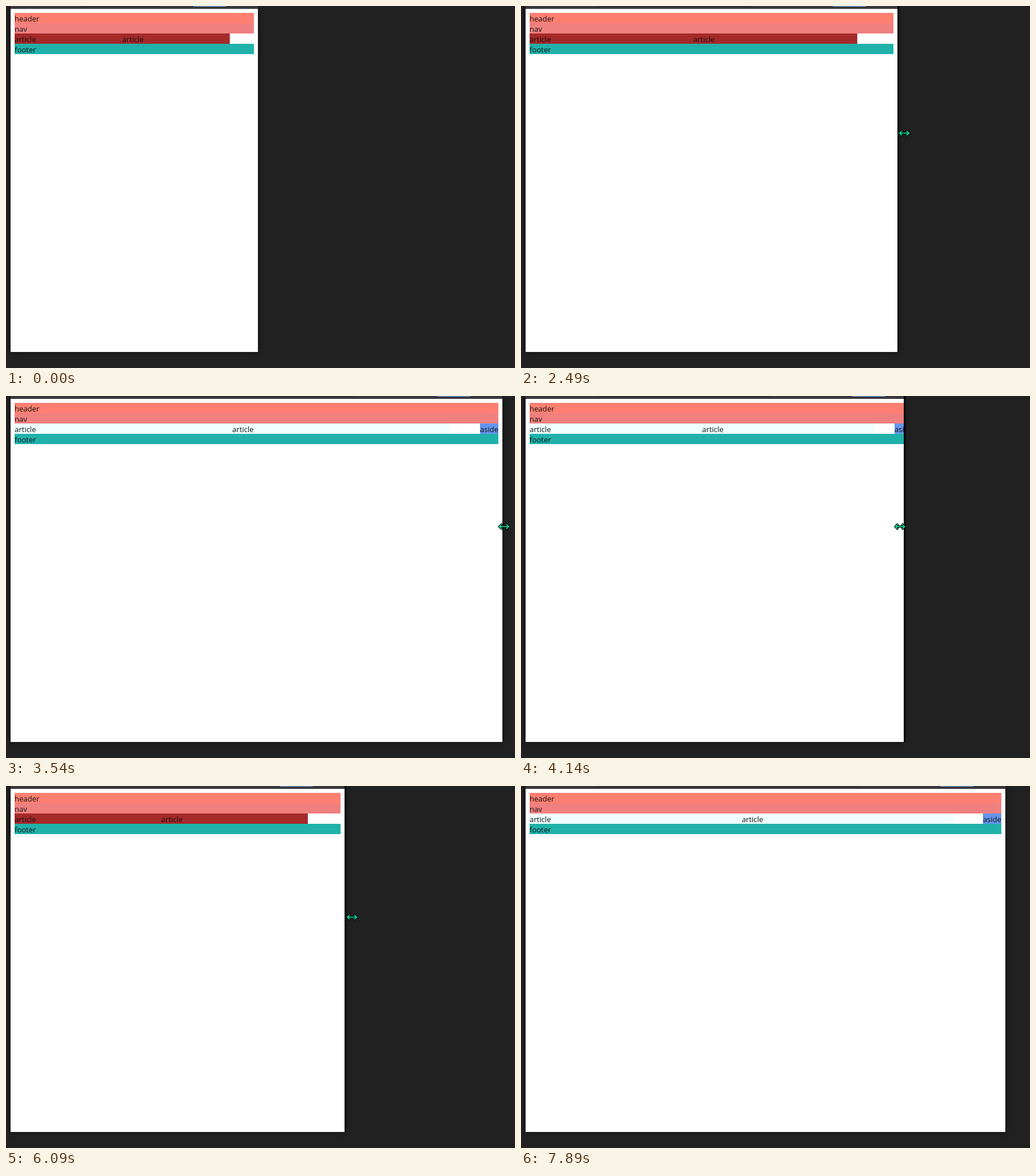
These frames come from a looping animation (887x632 px, 7.98 s). An HTML page:

```html
<!DOCTYPE html>
<html lang="en">
<head>
<meta charset="utf-8">
<title>Responsive layout</title>
<style>
html, body { margin: 0; width: 100%; height: 100%; overflow: hidden; background: #212121; }
#stage { position: relative; width: 887px; height: 632px; overflow: hidden; background: #212121; }
#stage div, #stage svg { position: absolute; }
#panel { left: 8px; top: 0; height: 604px; overflow: hidden; background: #fff; box-shadow: 0 0 9px rgba(0, 0, 0, .55); }
#bar { left: 0; top: 0; width: 100%; height: 5px; background: #3a373b; }
#field { left: 123px; top: 0; height: 1px; background: #29272b; border-radius: 0 0 4px 4px; }
#button { top: 0; width: 58px; height: 1px; background: #6fb2ea; border-radius: 0 0 5px 5px; }
#page { left: 7px; top: 12px; font: 13px/18px "Open Sans", "Noto Sans", sans-serif; color: #111; }
#page div { height: 18px; }
#page span { position: relative; top: 1px; }
.row { left: 0; width: 100%; }
.article { top: 36px; width: 45%; background: #a52a2a; }
.wide .article { background: #f0ffff; }
#aside { display: none; top: 36px; right: 0; background: #6495ed; }
.wide #aside { display: block; }
#gap { top: 0; height: 604px; background: #000; }
svg { left: 0; top: 0; overflow: visible; fill: none; stroke-linejoin: round; stroke-linecap: round; }
</style>
</head>
<body>
<div id="stage">
  <div id="panel">
    <div id="bar"></div><div id="field"></div><div id="button"></div>
    <div id="page">
      <div class="row" style="top:0;background:#ff8071"><span>header</span></div>
      <div class="row" style="top:18px;background:#f08080"><span>nav</span></div>
      <div class="article" style="left:0"><span>article</span></div>
      <div class="article" style="left:45%"><span>article</span></div>
      <div id="aside"><span>aside</span></div>
      <div class="row" style="top:54px;background:#20b2aa"><span>footer</span></div>
    </div>
  </div>
  <div id="gap"></div>
  <svg id="resize" width="1" height="1">
    <path id="arrows" d="M-8 0H8M-4.5 -3.5L-8 0L-4.5 3.5M4.5 -3.5L8 0L4.5 3.5" stroke="#000" stroke-width="3.8"/>
    <use href="#arrows"/>
    <path d="M-8 0H8M-4.5 -3.5L-8 0L-4.5 3.5M4.5 -3.5L8 0L4.5 3.5" stroke="#00f5b4" stroke-width="1.7"/>
  </svg>
  <svg id="arrow" width="1" height="1">
    <path d="M.5 .5V15.5L4 12.3L6.3 18L8.8 17L6.4 11.5H10.5Z" fill="#00f5b4" stroke="#000"/>
  </svg>
</div>
<script>
const LOOP = 7980, STEP = 30;
const MIN_EDGE = 439, BREAKPOINT = 666, GRIP = 3;
const DRAG = [1950, 7380];

// pointer path: time, x, y
const path = [
  [270, 880, 37], [480, 620, 136], [750, 427, 210], [900, 427, 210],
  [1020, 448, 220], [1260, 448, 220], [1560, 442, 213.5], [1830, 442, 215],
  [1950, 442, 215], [2490, 668, 222], [2610, 697, 223], [3420, 865, 228],
  [3540, 868, 228], [3660, 868, 228], [4230, 622, 228], [4740, 472.5, 228],
  [5040, 432, 226], [5070, 430, 226], [5250, 378, 226], [5400, 378, 226],
  [6090, 603, 229], [6180, 639, 229], [6990, 829, 229], [7200, 847, 229],
  [7380, 847, 229], [7530, 892, 111]
];

const $ = id => document.getElementById(id);
const clamp = (v, lo, hi) => Math.min(hi, Math.max(lo, v));

function slope(i, k) {
  if (i === 0 || i === path.length - 1) return 0;
  const rate = j => (path[j + 1][k] - path[j][k]) / (path[j + 1][0] - path[j][0]);
  const a = rate(i - 1), b = rate(i);
  return a * b > 0 ? 2 * a * b / (a + b) : 0;
}

// monotone cubic through the path points; k selects x (1) or y (2)
function at(t, k) {
  const last = path.length - 1;
  t = clamp(t, path[0][0], path[last][0]);
  let i = 0;
  while (i < last - 1 && t >= path[i + 1][0]) i++;
  const p = path[i], q = path[i + 1], h = q[0] - p[0], u = (t - p[0]) / h;
  const v = 1 - u;
  return v * v * ((1 + 2 * u) * p[k] + u * h * slope(i, k)) +
         u * u * ((3 - 2 * u) * q[k] - v * h * slope(i + 1, k));
}

const edgeAt = t => Math.max(MIN_EDGE, Math.round(at(clamp(t, ...DRAG), 1) - GRIP));

function place(el, shown, x, y) {
  el.style.display = shown ? "block" : "none";
  el.style.transform = `translate(${x}px, ${y}px)`;
}

function draw(t) {
  // the frame trails the pointer, the page layout trails the frame
  const frame = edgeAt(t - 18);
  const shrinking = edgeAt(t - 60) > frame;
  const layout = edgeAt(t - (shrinking ? 60 : 28));
  const edge = Math.min(frame, layout);

  $("panel").style.width = edge - 8 + "px";
  $("page").style.width = layout - 22 + "px";
  $("page").className = layout >= BREAKPOINT ? "wide" : "";
  $("field").style.width = Math.max(270, layout - 255) - 131 + "px";
  $("button").style.left = layout - 121 + "px";
  $("gap").style.left = edge + "px";
  $("gap").style.width = (Math.abs(frame - layout) > 1 ? 3 : 0) + "px";

  const x = Math.round(at(t, 1) * 2) / 2, y = Math.round(at(t, 2));
  const dragging = t >= 960 && t < DRAG[1];
  place($("resize"), dragging, x, y);
  place($("arrow"), !dragging && t >= 270 && t < 7530, x, y);
}

const start = performance.now();
function tick() {
  const t = (performance.now() - start) % LOOP;
  draw(Math.floor(t / STEP) * STEP);
  requestAnimationFrame(tick);
}
tick();
</script>
</body>
</html>
```
